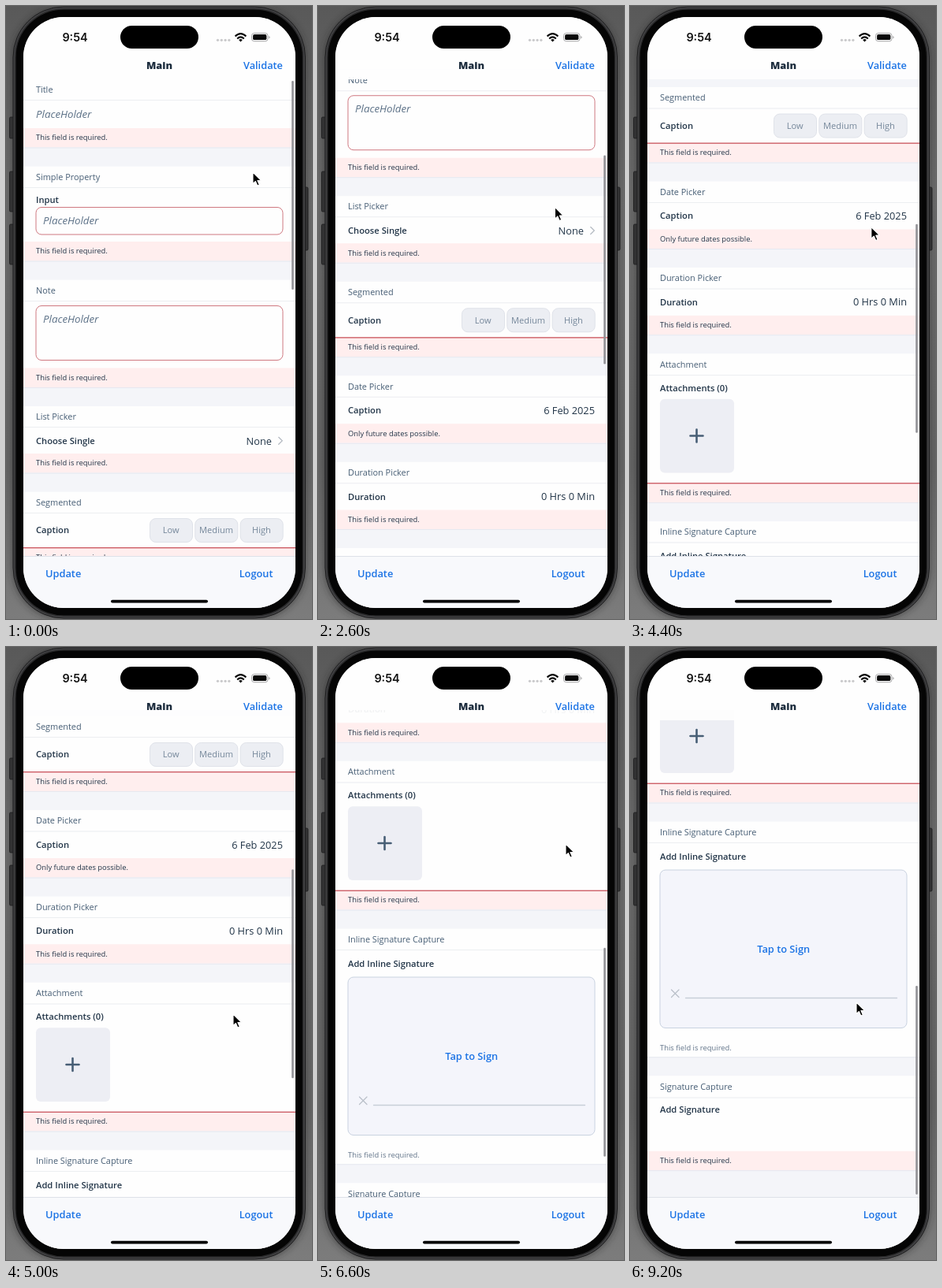
Animation of 388x778 px, one loop 9.4 s. Source, as an HTML page:

```html
<!DOCTYPE html>
<html lang="en">
<head>
<meta charset="utf-8">
<title>Form validation</title>
<style>
  html, body { margin: 0; width: 100%; height: 100%; overflow: hidden; background: #666; }
  svg { display: block; width: 388px; height: 778px; }
  text { font-family: "Open Sans", "Noto Sans", sans-serif; white-space: pre; }
  .title { font-size: 10.9px; fill: #475e75; }
  .label { font-size: 11.2px; font-weight: 600; fill: #223548; }
  .value { font-size: 12.8px; fill: #223548; }
  .hint { font-size: 13.3px; font-style: italic; fill: #5b7086; }
  .error { font-size: 9.4px; fill: #223548; }
  .muted { font-size: 9.4px; fill: #627489; }
  .seg { font-size: 11.1px; fill: #75879a; }
  .link { font-size: 12.8px; font-weight: 600; fill: #1b73e5; }
  .head { font-size: 12.8px; font-weight: 800; fill: #1d2d3e; }
  .clock { font: 600 14.4px Inter, sans-serif; fill: #111; }
</style>
</head>
<body>
<svg id="stage" viewBox="0 0 388 778" xmlns="http://www.w3.org/2000/svg">
  <defs>
    <linearGradient id="wall" x2="0" y2="1">
      <stop offset="0" stop-color="#595959"/>
      <stop offset=".3" stop-color="#6c6c6c"/>
      <stop offset=".75" stop-color="#666"/>
      <stop offset="1" stop-color="#7c7c7c"/>
    </linearGradient>
    <filter id="blur" x="-10%" y="-10%" width="120%" height="120%"><feGaussianBlur stdDeviation="5"/></filter>
    <clipPath id="screen"><rect x="22" y="14" width="345" height="750" rx="51"/></clipPath>
    <clipPath id="view"><rect x="22" y="80" width="345" height="619"/></clipPath>
  </defs>

  <rect width="388" height="778" fill="url(#wall)"/>
  <rect x="8" y="2" width="372" height="776" rx="64" fill="#222" opacity=".55" filter="url(#blur)"/>
  <g fill="#323233" stroke="#1c1c1d" stroke-width=".8">
    <rect x="4.5" y="141" width="7" height="27" rx="1.5"/>
    <rect x="4.5" y="210" width="7" height="51" rx="1.5"/>
    <rect x="4.5" y="277" width="7" height="51" rx="1.5"/>
    <rect x="376" y="230" width="7" height="80" rx="1.5"/>
  </g>
  <rect x="9" y="1" width="370.5" height="776" rx="64" fill="#414143" stroke="#1d1d1e"/>
  <rect x="12" y="4" width="364.5" height="770" rx="61" fill="#050505" stroke="#29292a" stroke-width="1.4"/>

  <g clip-path="url(#screen)">
    <rect x="22" y="14" width="345" height="750" fill="#fefefe"/>
    <g clip-path="url(#view)"><g id="page"></g></g>
    <rect x="22" y="14" width="345" height="79" fill="#fefefe" opacity=".94"/>
    <rect id="thumb" x="362.2" y="95" width="2.6" height="265" rx="1.3" fill="#929296"/>
    <rect x="22" y="698" width="345" height="66" fill="#f8f9fc"/>
    <path d="M22 698.5H367" stroke="#dee1e8"/>
    <g id="bars"></g>
    <rect x="145" y="25" width="99" height="29" rx="14.5" fill="#000"/>
    <g fill="#c9c9cb">
      <circle cx="268.5" cy="43.3" r="1.6"/><circle cx="273.3" cy="43.3" r="1.6"/>
      <circle cx="278.1" cy="43.3" r="1.6"/><circle cx="282.9" cy="43.3" r="1.6"/>
    </g>
    <g fill="none" stroke="#0a0a0a" stroke-width="2.1">
      <path d="M290.6 38.6Q297.5 31.8 304.4 38.6"/>
      <path d="M293.2 41.4Q297.5 37.2 301.8 41.4"/>
    </g>
    <path d="M295.1 42.9Q297.5 41 299.9 42.9L297.5 45.4Z" fill="#0a0a0a"/>
    <rect x="311.5" y="34.5" width="20.5" height="10.2" rx="3.2" fill="none" stroke="#a5a5a7"/>
    <rect x="313.1" y="36.1" width="17.3" height="7" rx="1.9" fill="#0a0a0a"/>
    <path d="M333.3 38v3.4q1.4-.5 1.4-1.7t-1.4-1.7" fill="#a5a5a7"/>
    <rect x="133" y="753.7" width="123" height="3.8" rx="1.9" fill="#000"/>
  </g>
  <path id="cursor" d="M0 0V14.6L3.4 11.5L5.8 17L8.3 15.9L5.9 10.6L10.4 10.3Z"
    fill="#000" stroke="#fff" stroke-width="1.1" stroke-linejoin="round"/>
</svg>
<script>
const LOOP = 9400, STEP = 200, LEFT = 38, RIGHT = 351;
const $ = id => document.getElementById(id);
const SIZE = { title: 10.9, label: 11.2, value: 12.8, hint: 13.3, error: 9.4, muted: 9.4,
  seg: 11.1, link: 12.8, head: 12.8, clock: 14.4 };

// y is the middle of the capitals
const text = (cls, x, y, str, anchor = 'start') =>
  `<text class="${cls}" x="${x}" y="${y + SIZE[cls] * .357}" text-anchor="${anchor}">${str}</text>`;
const rect = (x, y, w, h, fill, r = 0, stroke = 'none') =>
  `<rect x="${x}" y="${y}" width="${w}" height="${h}" rx="${r}" fill="${fill}" stroke="${stroke}"/>`;
const path = (d, stroke, width = 1) =>
  `<path d="${d}" fill="none" stroke="${stroke}" stroke-width="${width}" stroke-linecap="round"/>`;
const rule = (y, color) => rect(22, y, 345, 1, color);

const title = (y, str) => text('title', LEFT, y, str) + rule(y + 13, '#eceef1');
const label = (y, str) => text('label', LEFT, y, str);
const value = (y, str, x = RIGHT) => text('value', x, y, str, 'end');
const gap = (y, h = 24) => rect(22, y, 345, h, '#f4f5f9') + rule(y, '#e6e8f0');
const error = (y, str = 'This field is required.') =>
  rect(22, y, 345, 24.5, '#ffeeee') + text('error', LEFT, y + 12, str) + gap(y + 24.5);
const field = (y, h) =>
  rect(38, y + .5, 313, h, '#fefefe', 7, '#cf7880') + text('hint', 47, y + 17.5, 'PlaceHolder');
const redLine = y => rect(22, y, 345, 1.3, '#c9545c');
const segment = (x, str) =>
  rect(x + .5, 650.5, 54, 30, '#eceef3', 7.5, '#dfe2e9') + text('seg', x + 27.3, 665.5, str, 'middle');

$('page').innerHTML = [
  title(106, 'Title'),
  text('hint', LEFT, 137.5, 'PlaceHolder'),
  error(155),

  title(217, 'Simple Property'),
  label(246, 'Input'), field(255, 34.5),
  error(299),

  title(361, 'Note'),
  field(380, 69),
  error(459.5),

  title(521, 'List Picker'),
  label(552, 'Choose Single'), value(552, 'None', 337),
  path('M345.7 547.3L350.3 551.8L345.7 556.3', '#b3b9c1', 1.2),
  error(568),

  title(630, 'Segmented'),
  label(665.5, 'Caption'),
  segment(182, 'Low'), segment(239.3, 'Medium'), segment(296.7, 'High'),
  error(687.5), redLine(687),

  title(749.5, 'Date Picker'),
  label(780, 'Caption'), value(780, '6 Feb 2025'),
  error(797, 'Only future dates possible.'),

  title(859, 'Duration Picker'),
  label(889.3, 'Duration'), value(889.3, '0 Hrs 0 Min'),
  error(906.3),

  title(968.5, 'Attachment'),
  label(998.2, 'Attachments (0)'),
  rect(38, 1012.3, 94, 93.7, '#edeef4', 6),
  path('M76.5 1059H92.5M84.5 1051V1067', '#475e75', 2.6),
  error(1119), redLine(1118.6),

  title(1181, 'Inline Signature Capture'),
  label(1211.6, 'Add Inline Signature'),
  rect(38, 1229, 313, 200.5, '#f4f5fb', 7, '#c9d2e0'),
  text('link', 194.7, 1329, 'Tap to Sign', 'middle'),
  path('M52.5 1381L62 1390.5M62 1381L52.5 1390.5', '#b9bfc8', 1.2),
  path('M70.5 1391.5H338.5', '#c8ced8', 1.3),
  text('muted', LEFT, 1454.3, 'This field is required.'),
  gap(1466.3),

  title(1504.5, 'Signature Capture'),
  label(1533.2, 'Add Signature'),
  error(1585.7), gap(1610.2, 40)
].join('');

$('bars').innerHTML = [
  text('clock', 87.5, 39.7, '9:54', 'middle'),
  text('head', 194.5, 75.5, 'Main', 'middle'),
  text('link', RIGHT, 75.5, 'Validate', 'end'),
  text('link', 50, 720, 'Update'),
  text('link', 338.5, 720, 'Logout', 'end')
].join('');

// [ms, scroll offset]
const scroll = [[0, 0], [1000, 0], [1600, 111.5], [3400, 391], [3800, 455], [4200, 502],
  [4600, 525], [4900, 529], [5000, 529], [5800, 656], [6200, 730], [6600, 810],
  [7000, 860], [7400, 879.5], [7600, 879.5], [8000, 923], [8300, 941], [8600, 946]];
// [ms, x, y]
const pointer = [[0, 313, 211], [200, 311, 225], [900, 276, 520], [1000, 275, 522], [1600, 276, 411],
  [3400, 320, 131], [3800, 324, 112], [4100, 320, 140], [4800, 287, 468], [5000, 288, 466],
  [5800, 303, 349], [6400, 315, 245], [6600, 314, 250], [7300, 286, 476], [7600, 287, 473],
  [7900, 287, 455], [8600, 287, 451]];

function at(keys, t) {
  const i = keys.findIndex(k => k[0] > t);
  if (i < 0) return keys[keys.length - 1].slice(1);
  const a = keys[i - 1], b = keys[i], p = (t - a[0]) / (b[0] - a[0]);
  return a.slice(1).map((v, n) => v + (b[n + 1] - v) * p);
}

function draw(now) {
  const t = Math.floor(now % LOOP / STEP) * STEP;
  const [s] = at(scroll, t), [x, y] = at(pointer, t);
  $('page').setAttribute('transform', `translate(0 ${-s})`);
  $('thumb').setAttribute('y', 95 + s * .354);
  $('cursor').setAttribute('transform', `translate(${x} ${y})`);
}

const start = performance.now();
function tick() {
  draw(performance.now() - start);
  requestAnimationFrame(tick);
}
tick();
</script>
</body>
</html>
```
